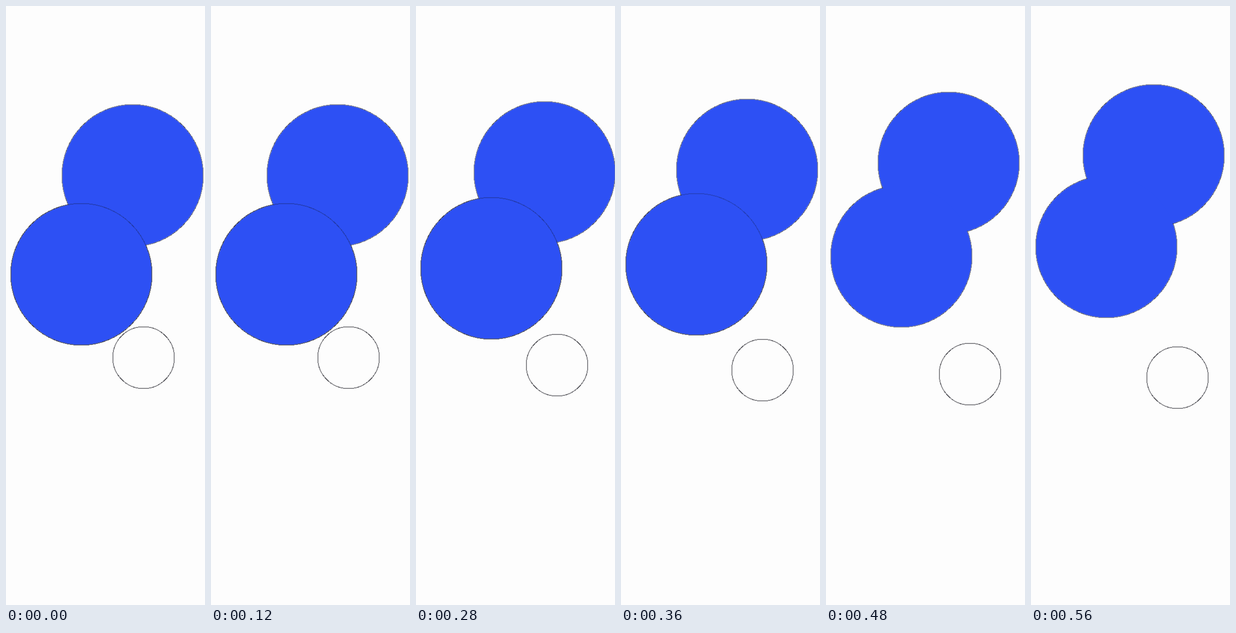
These frames come from a looping animation (400x1200 px, 600 ms). An HTML page:

```html
<!DOCTYPE html>
<html lang="en">
<head>
<meta charset="utf-8">
<title>Drifting circles</title>
<style>
  html, body { margin: 0; width: 100%; height: 100%; overflow: hidden; background: #fdfdfd; }
  svg { display: block; width: 400px; height: 1200px; }
  circle { fill: none; stroke: #101018; stroke-width: 1; shape-rendering: crispEdges; }
  .disc { fill: #2d50f4; stroke: none; }

  /* Each pose is held for 40 ms */
  .upper, .lower, .ring, .seam { animation: 600ms infinite; }
  .upper { animation-name: upper; }
  .lower { animation-name: lower; }
  .ring { animation-name: ring; }
  .seam { animation-name: seam; animation-timing-function: steps(1); }

  @keyframes upper {
    0%      { transform: translate(254.5px, 339.5px); animation-timing-function: steps(1); }
    20%     { transform: translate(254.5px, 339.5px); animation-timing-function: steps(4); }
    46.666% { transform: translate(258.5px, 333.5px); animation-timing-function: steps(2); }
    60%     { transform: translate(253.5px, 328.5px); animation-timing-function: steps(2); }
    73.333% { transform: translate(246.5px, 317.5px); animation-timing-function: steps(1); }
    80%     { transform: translate(246.5px, 314.5px); animation-timing-function: steps(2); }
    93.333%, 100% { transform: translate(246.5px, 299.5px); }
  }
  @keyframes lower {
    0%      { transform: translate(151.5px, 537.5px); animation-timing-function: steps(1); }
    20%     { transform: translate(151.5px, 537.5px); animation-timing-function: steps(4); }
    46.666% { transform: translate(151.5px, 525.5px); animation-timing-function: steps(2); }
    60%     { transform: translate(151.5px, 517.5px); animation-timing-function: steps(2); }
    73.333% { transform: translate(151.5px, 505.5px); animation-timing-function: steps(1); }
    80%     { transform: translate(151.5px, 501.5px); animation-timing-function: steps(2); }
    93.333%, 100% { transform: translate(151.5px, 482.5px); }
  }
  @keyframes ring {
    0%      { transform: translate(276.5px, 704.5px); animation-timing-function: steps(1); }
    20%     { transform: translate(276.5px, 704.5px); animation-timing-function: steps(4); }
    46.666% { transform: translate(283.5px, 719.5px); animation-timing-function: steps(2); }
    60%     { transform: translate(284.5px, 729.5px); animation-timing-function: steps(2); }
    73.333% { transform: translate(289.5px, 736.5px); animation-timing-function: steps(1); }
    80%     { transform: translate(289.5px, 737.5px); animation-timing-function: steps(2); }
    93.333%, 100% { transform: translate(294.5px, 744.5px); }
  }
  @keyframes seam {
    0%      { opacity: .5; }
    60%     { opacity: .4; }
    73.333% { opacity: .06; }
    80%, 100% { opacity: 0; }
  }
</style>
</head>
<body>
<svg viewBox="0 0 400 1200">
  <!-- outlines first, so the fills hide them where the discs overlap -->
  <g class="upper"><circle r="142"/></g>
  <g class="lower"><circle r="142"/></g>
  <g class="upper"><circle class="disc" r="141.5"/></g>
  <g class="lower">
    <circle class="disc" r="141.5"/>
    <circle class="seam" r="142"/>
  </g>
  <circle class="ring" r="62"/>
</svg>
</body>
</html>
```
